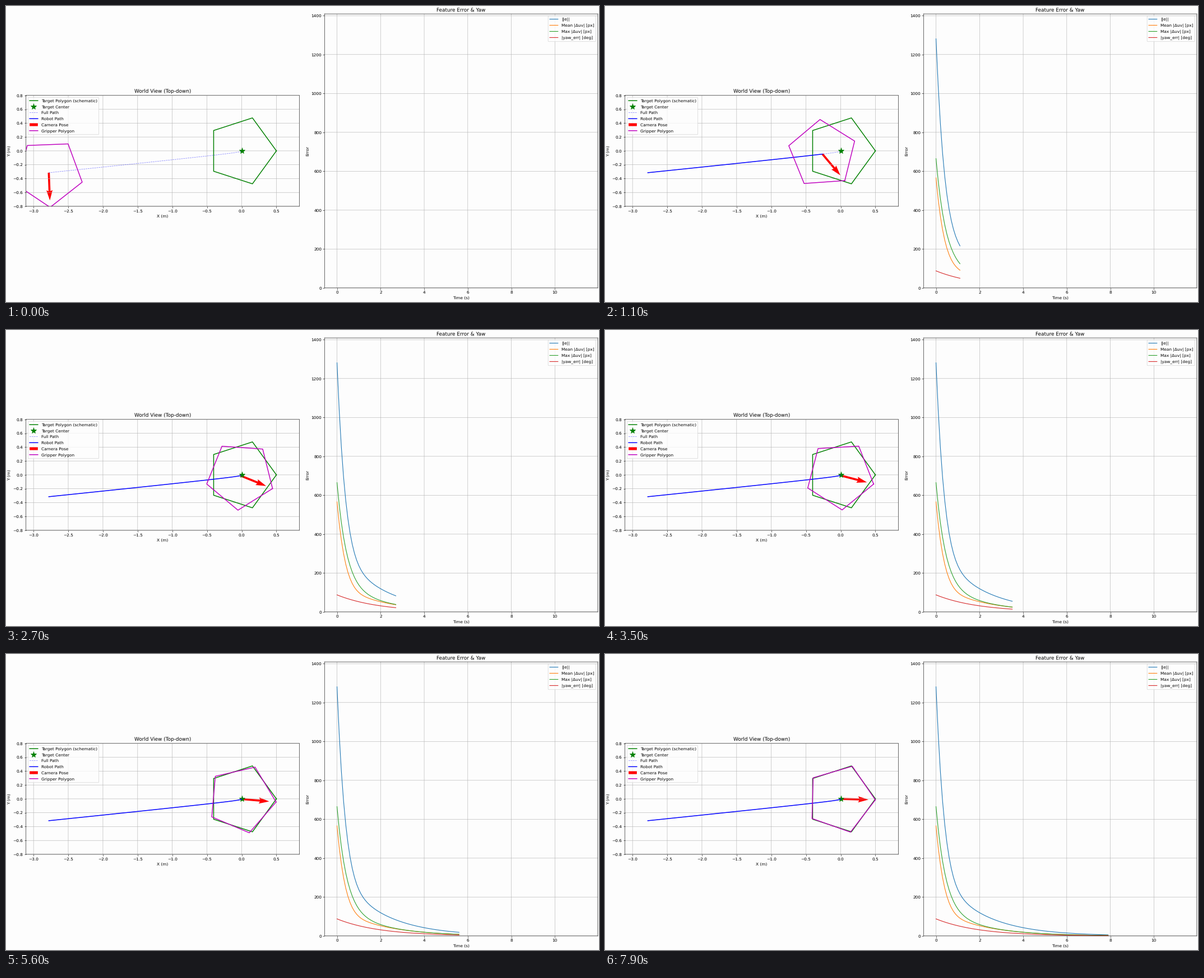
A matplotlib script for the animation above (8000 ms loop, 1058 by 529 pixels).

```python
import numpy as np
import matplotlib.pyplot as plt
from matplotlib.animation import FuncAnimation

W, H, DPI = 1058, 529, 52.9
FRAMES, STEP_MS = 80, 100
TOTAL_STEPS = 115
DT = 0.1
ARROW_LEN = 0.4
PAPER = "#fdfdfd"

# Subpixel placement gives the look of a smoothly scaled plot.
plt.rcParams.update({
    "font.family": "DejaVu Sans",
    "text.hinting": "none",
    "path.snap": False,
    "axes.facecolor": PAPER,
    "axes.labelpad": 4.4,
    "legend.labelspacing": 0.54,
})

# Translation settles quickly, rotation slowly.
steps = np.arange(TOTAL_STEPS)
times = steps * DT
fast = 0.8 ** steps
slow = 0.95 ** steps

path_x = -2.73 * fast - 0.05 * slow
path_y = -0.275 * fast - 0.04 * slow
yaw_err = 87.8 * slow


def blend(start, slow_amp, coupling):
    """Norm of a fast and a slow error part whose sum begins at start."""
    half = coupling * slow_amp
    fast_amp = -half + np.sqrt(half**2 + start**2 - slow_amp**2)
    a, b = fast_amp * fast, slow_amp * slow
    return np.sqrt(a**2 + b**2 + 2 * coupling * a * b)


def pentagon(x, y, angle):
    a = angle + np.arange(6) * 2 * np.pi / 5
    return x + 0.5 * np.cos(a), y + 0.5 * np.sin(a)


def add_axes(left, top, right, bottom):
    return fig.add_axes([left / W, 1 - bottom / H,
                         (right - left) / W, (bottom - top) / H])


fig = plt.figure(figsize=(W / DPI, H / DPI), dpi=DPI, facecolor=PAPER)

# World view
world = add_axes(35.5, 159.8, 523.3, 358.0)
world.set_xlim(-3.11, 0.83)
world.set_ylim(-0.8, 0.8)
world.set_xticks(np.arange(-3, 0.6, 0.5))
world.set_yticks(np.linspace(-0.8, 0.8, 9))
world.set_title("World View (Top-down)")
world.set_xlabel("X (m)")
world.set_ylabel("Y (m)")
world.grid(True)

world.plot(*pentagon(0, 0, 0), "g-", lw=2, label="Target Polygon (schematic)")
world.plot([0], [0], "g*", ms=15, label="Target Center")
world.plot(path_x, path_y, "b--", lw=1, alpha=0.5, label="Full Path")
trail, = world.plot([], [], "b-", lw=2, label="Robot Path")
arrow = world.quiver([path_x[0]], [path_y[0]], [0], [-ARROW_LEN],
                     angles="xy", scale_units="xy", scale=1,
                     color="r", label="Camera Pose")
gripper, = world.plot([], [], "m-", lw=2, label="Gripper Polygon")
world.legend(loc="upper left")

# Error plot
errors = add_axes(568.4, 14.1, 1055.9, 503.9)
errors.set_xlim(-0.57, 11.97)
errors.set_ylim(0, 1409)
errors.set_xticks(range(0, 11, 2))
errors.set_yticks(range(0, 1401, 200))
errors.set_title("Feature Error & Yaw")
errors.set_xlabel("Time (s)")
errors.set_ylabel("Error")
errors.grid(True)

series = [
    ("||e||", blend(1281, 331, 0)),
    ("Mean |Δuv| [px]", blend(566, 148, -0.14)),
    ("Max |Δuv| [px]", blend(665, 150, 0.75)),
    ("|yaw_err| [deg]", yaw_err),
]
curves = [errors.plot([], [], label=name)[0] for name, _ in series]
errors.legend(loc="upper right")


def update(i):
    x, y, yaw = path_x[i], path_y[i], -np.radians(yaw_err[i])
    trail.set_data(path_x[:i + 1], path_y[:i + 1])
    gripper.set_data(*pentagon(x, y, yaw))
    arrow.set_offsets([[x, y]])
    arrow.set_UVC([ARROW_LEN * np.cos(yaw)], [ARROW_LEN * np.sin(yaw)])
    for curve, (_, values) in zip(curves, series):
        curve.set_data(times[:i + 1], values[:i + 1])
    return [trail, gripper, arrow, *curves]


anim = FuncAnimation(fig, update, frames=FRAMES, interval=STEP_MS,
                     init_func=lambda: update(0), repeat=True,
                     repeat_delay=0, blit=False)
plt.show()
```
